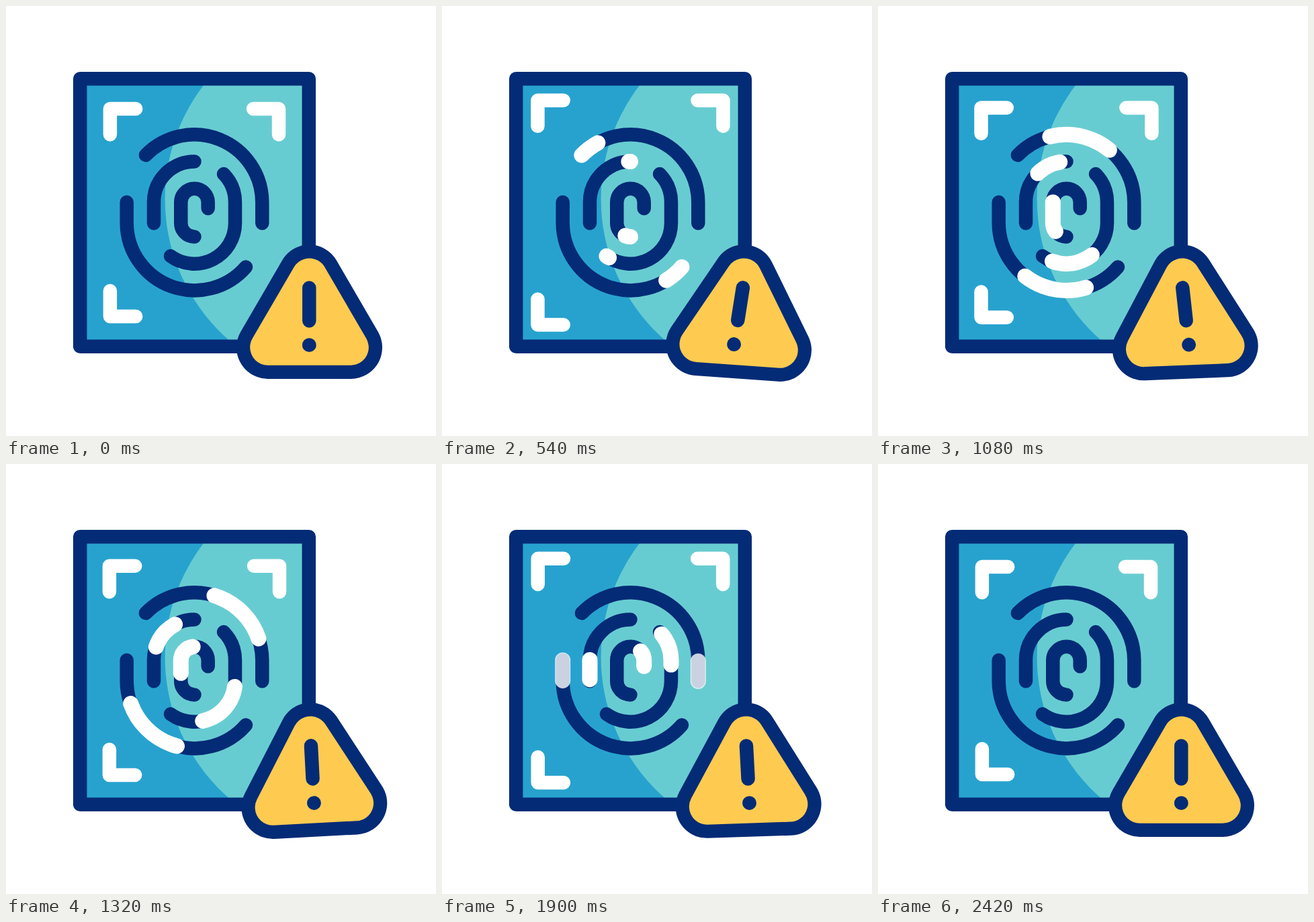
An HTML page for the animation above (2620 ms loop, 640 by 640 pixels).

```html
<!DOCTYPE html>
<html lang="en">
<head>
<meta charset="utf-8">
<title>Fingerprint scan warning</title>
<style>
  html, body { margin: 0; width: 100%; height: 100%; overflow: hidden; background: #fff; }
  svg { display: block; width: 100vw; height: 100vh; }
  .line { fill: none; stroke: #042b76; stroke-width: 20.5; stroke-linecap: round; stroke-linejoin: round; }
  .white { stroke: #fff; }
  .glow { stroke: #fff; stroke-width: 23; }
</style>
</head>
<body>
<svg viewBox="0 0 640 640">
  <path fill="#27a2ce" d="M110 108H451V507H110Z"/>
  <path fill="#67ccd1" d="M294 118A279 279 0 0 0 332.5 498H446V118Z"/>
  <path class="line" d="M110.2 108.3H450.8V506.8H110.2Z"/>
  <g id="corners">
    <path class="line white" d="M154.9 191.2V152.9H193.2"/>
    <path class="line white" d="M368 152.9H406V191.2"/>
    <path class="line white" d="M154.9 424V462H193.2"/>
  </g>
  <g id="print"></g>
  <g id="sign" stroke-linejoin="round">
    <path fill="none" stroke="#042b76" stroke-width="93.4" d="M451.5 402L513.3 508.2H389.7Z"/>
    <path fill="#fecb50" stroke="#fecb50" stroke-width="53" d="M451.5 402L513.3 508.2H389.7Z"/>
    <g id="mark">
      <path class="line" d="M451.3 419.4V468.6"/>
      <circle cx="451.3" cy="504.7" r="10.4" fill="#042b76"/>
    </g>
  </g>
</svg>
<script>
const LOOP = 2620;
const SWEEP = 1640;   // time a sweep end takes along its ridge
const LAG = 400;      // tail of the sweep behind its head
const byId = id => document.getElementById(id);
const clamp = x => Math.min(1, Math.max(0, x));
const ease = x => (1 - Math.cos(Math.PI * clamp(x))) / 2;
const smooth = x => (x = clamp(x), x * x * (3 - 2 * x));

// Ridges of the fingerprint with the start time of their sweep
const ridges = [
  ['M207.9 222A101 101 0 0 1 381.3 292V323.3', 200],
  ['M357 388.5A101 101 0 0 1 179.7 323.3V292', 200],
  ['M280.5 231.5A60.5 60.5 0 0 0 220 292V323.3', 400],
  ['M245 372.2A60.5 60.5 0 0 0 341 323.3V292A60.5 60.5 0 0 0 324 250', 400],
  ['M280.5 343.4A20.2 20.2 0 0 1 260.3 323.2V292A20.2 20.2 0 0 1 300.7 292V301.3', 300],
];

function addRidge(d, className) {
  const path = document.createElementNS('http://www.w3.org/2000/svg', 'path');
  path.setAttribute('d', d);
  path.setAttribute('class', className);
  path.setAttribute('pathLength', 1);
  return byId('print').appendChild(path);
}
ridges.forEach(([d]) => addRidge(d, 'line'));
const sweeps = ridges.map(([d, start]) => ({ path: addRidge(d, 'line glow'), start }));

// Fading shake as [time, degrees]
const shake = [[0, 0], [590, 5], [1105, -4], [1500, 3], [1810, -2], [2070, 1], [2300, 0]];

function shakeAngle(t) {
  let angle = 0;
  for (let i = 1; i < shake.length; i++) {
    const [t0, a0] = shake[i - 1], [t1, a1] = shake[i];
    angle += (a1 - a0) * ease((t - t0) / (t1 - t0));
  }
  return angle;
}

function draw(t) {
  const shift = 12.8 * (1 - Math.cos(2 * Math.PI * Math.min(t, 2420) / 1210)) / 2;
  [[-1, -1], [1, -1], [-1, 1]].forEach(([x, y], i) =>
    byId('corners').children[i].setAttribute('transform', `translate(${x * shift} ${y * shift})`));

  for (const { path, start } of sweeps) {
    const age = t - start;
    const head = smooth(age / SWEEP), tail = smooth((age - LAG) / SWEEP);
    path.style.strokeDasharray = `${head - tail} 2`;
    path.style.strokeDashoffset = -tail;
    path.style.opacity = clamp((age - 20) / 100) * clamp((1780 - age) / 100);
  }

  byId('sign').setAttribute('transform', `rotate(${shakeAngle(t - 120)} 451.5 369)`);
  byId('mark').setAttribute('transform', `rotate(${shakeAngle(t)} 451.3 421)`);
}

const begin = performance.now();
function tick() {
  draw((performance.now() - begin) % LOOP);
  requestAnimationFrame(tick);
}
tick();
</script>
</body>
</html>
```
